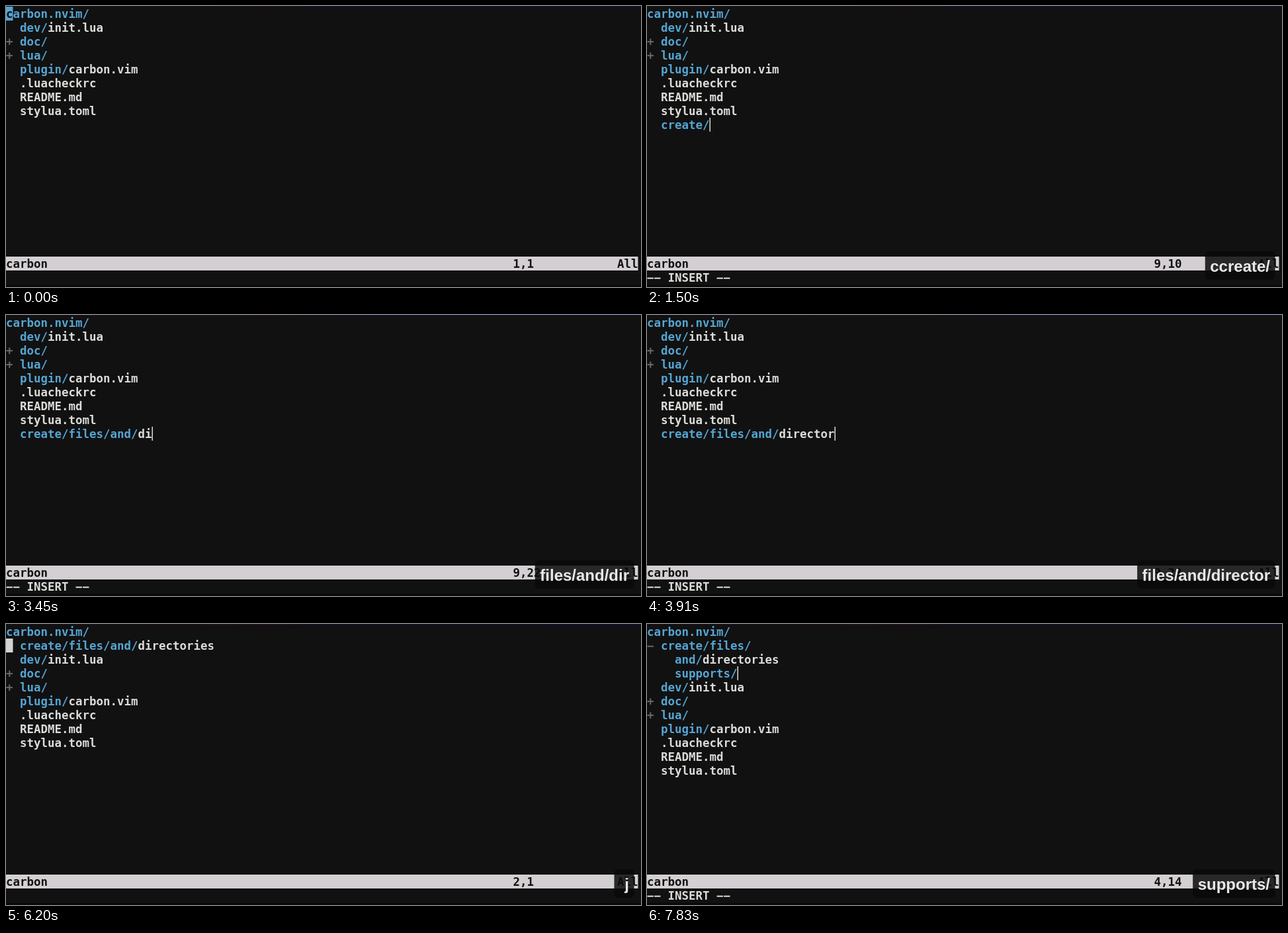
Animation, 960 px wide and 425 px high, one loop 8000 ms. Source, as an HTML page with a canvas:

```html
<!DOCTYPE html>
<html lang="en">
<head>
<meta charset="utf-8">
<title>File tree</title>
<style>
html, body { margin: 0; width: 100%; height: 100%; overflow: hidden; background: #111; }
canvas { display: block; }
</style>
</head>
<body>
<canvas id="stage" width="960" height="425"></canvas>
<script>
const ctx = document.getElementById('stage').getContext('2d');
const LOOP = 8000, COL = 10.5, ROW = 21, LAG = 40;
const BG = '#111111', FG = '#dbdbd8', BLUE = '#55a5d3', GREY = '#666666', BAR = '#d4cfd3';
const MONO = 'bold 17.44px "DejaVu Sans Mono", monospace';
const SANS = 'bold 24px "Liberation Sans", Arial, sans-serif';

const root = 'carbon.nvim/';
const files = ['  dev/init.lua', '+ doc/', '+ lua/', '  plugin/carbon.vim',
  '  .luacheckrc', '  README.md', '  stylua.toml'];

// Typed runs: text, time of first key, time of last key
const runs = [
  ['cre', 950, 1120], ['ate/', 1250, 1460],
  ['files', 2250, 2490], ['/and', 2620, 2950], ['/', 3160, 3160],
  ['dir', 3330, 3450], ['ectories', 3530, 4080],
  ['supports', 7120, 7620], ['/', 7830, 7830]
];
const keys = runs.flatMap(([text, a, b]) => [...text].map((ch, i) => ({
  ch,
  time: a + (b - a) * i / Math.max(1, text.length - 1),
  lag: text === '/' ? 0 : LAG
})));

// Key overlay: start time, leading text, optional box width
const caps = [
  [540, '', 28], [580, 'c'], [2250, ''], [4660, '', 40], [4700, '↩', 40],
  [5500, 'j'], [6200, 'j', 30], [6240, '2', 30], [6330, '2c'], [7120, '']
];

const join = list => list.map(k => k.ch).join('');
const typed = (t, from) => join(keys.filter(k => k.time >= from && k.time + k.lag <= t));

function rect(x, y, w, h, color) {
  ctx.fillStyle = color;
  ctx.fillRect(x, y, w, h);
}

function put(text, col, row, color) {
  ctx.fillStyle = color;
  ctx.fillText(text, col * COL, row * ROW + 18);
}

function drawLine(line, row) {
  const cut = line.lastIndexOf('/') + 1;
  const marked = line[1] === ' ';
  if (marked) put(line[0], 0, row, GREY);
  const start = marked ? 2 : 0;
  put(line.slice(start, cut), start, row, BLUE);
  const from = Math.max(start, cut);
  put(line.slice(from), from, row, FG);
}

function view(t) {
  if (t < 620) return { lines: [root, ...files], row: 0 };
  if (t < 4750) {
    return { lines: [root, ...files, '  ' + typed(t, 0)], row: 8, insert: true };
  }
  if (t < 6410) {
    return { lines: [root, '  create/files/and/directories', ...files], row: t < 5540 ? 0 : 1 };
  }
  return {
    lines: [root, '− create/files/', '    and/directories', '    ' + typed(t, 7000), ...files],
    row: 3, insert: true
  };
}

function drawKeys(t) {
  const cap = caps.filter(c => c[0] <= t).pop();
  if (!cap) return;
  const [from, lead, width] = cap;
  const text = lead + join(keys.filter(k => k.time >= from && k.time <= t));
  ctx.font = SANS;
  const w = width || ctx.measureText(text).width + 15;
  ctx.fillStyle = 'rgba(9,9,9,0.84)';
  ctx.beginPath();
  ctx.roundRect(949.5 - w, 371, w, 43, 6);
  ctx.fill();
  ctx.fillStyle = '#e8e8e8';
  ctx.textAlign = 'right';
  ctx.fillText(text, 942, 402);
  ctx.textAlign = 'left';
}

const edge = ctx.createLinearGradient(0, 0, 960, 0);
edge.addColorStop(0, '#140c18');
edge.addColorStop(0.42, '#2a0a26');
edge.addColorStop(0.6, '#0a0a40');
edge.addColorStop(1, '#0a0a48');

function draw(t) {
  const { lines, row, insert } = view(t);
  rect(0, 0, 960, 425, BG);
  rect(0, 0, 960, 1, edge);
  rect(0, 422, 960, 3, '#0c0809');
  ctx.font = MONO;
  lines.forEach(drawLine);

  const line = lines[row], top = row * ROW + 1;
  if (insert) {
    rect(line.length * COL, top, 1.5, ROW, FG);
    put('−− INSERT −−', 0, 19, FG);
  } else {
    rect(0, top, COL, ROW, row ? '#d3d3d3' : BLUE);
    put(line[0], 0, row, BG);
  }

  rect(0, 379, 91 * COL, ROW, BAR);
  put('carbon', 0, 18, BG);
  put(`${row + 1},${insert ? line.length + 1 : 1}`, 73, 18, BG);
  put('All', 88, 18, BG);
  drawKeys(t);
}

function tick() {
  draw(performance.now() % LOOP);
  requestAnimationFrame(tick);
}
tick();
</script>
</body>
</html>
```
